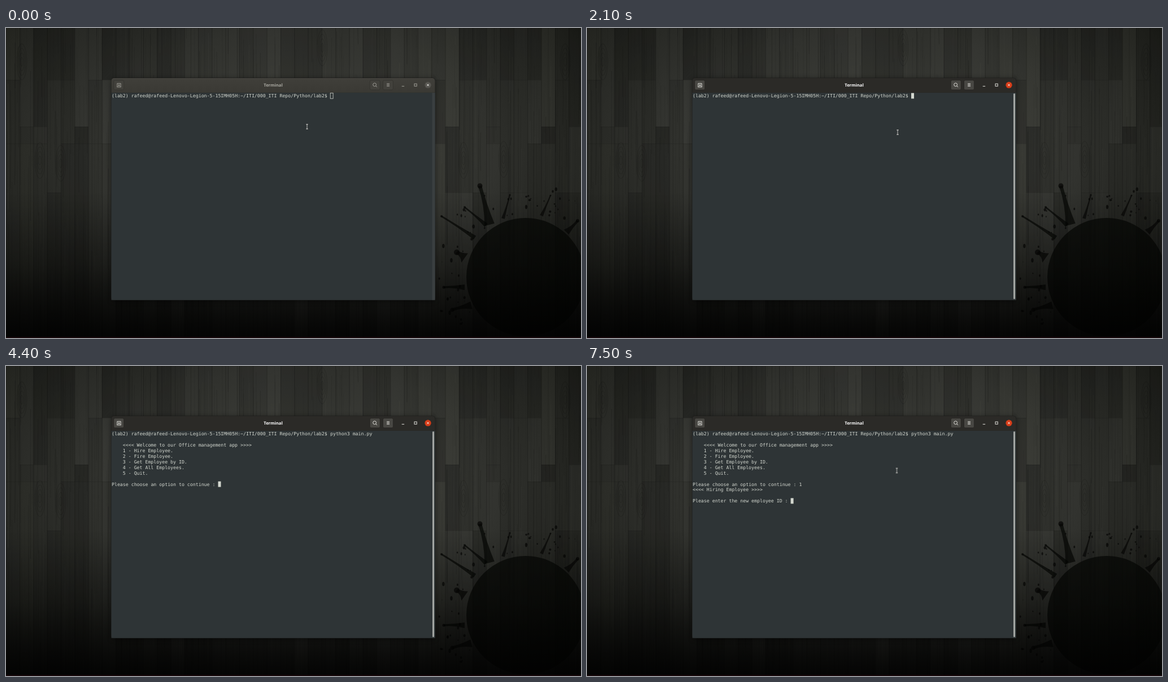
An HTML page with a canvas that plays this animation: 1018x550 px, repeating every 8000 ms.

```html
<!DOCTYPE html>
<html lang="en">
<head>
<meta charset="utf-8">
<title>Terminal session</title>
<style>
  html, body { margin: 0; width: 100%; height: 100%; overflow: hidden; background: #0a0b09; }
  canvas, svg { position: absolute; left: 0; top: 0; width: 1018px; height: 550px; }
  text { text-rendering: geometricPrecision; white-space: pre; }
  .term { font: 8.24px "DejaVu Sans Mono", "Noto Sans Mono", monospace; fill: #d3d7cf; }
  .title { font: bold 7.6px "Noto Sans", "Open Sans", sans-serif; text-anchor: middle; }

  .idle, .focus, .hollow, .block, .clear, .run, .menu, .hire, .mouse {
    animation: 8s step-end infinite;
  }
  .idle { animation-name: idle; }
  .focus { animation-name: focus; }
  .hollow { animation-name: hollow; }
  .block { animation-name: block; }
  .clear { animation-name: clear; }
  .run { animation-name: run; }
  .menu { animation-name: menu; }
  .hire { animation-name: hire; }
  .mouse { animation-name: mouse; }

  @keyframes idle { 0% { opacity: 1 } 26.25%, 100% { opacity: 0 } }
  @keyframes focus { 0% { opacity: 0 } 26.25%, 100% { opacity: 1 } }
  @keyframes hollow { 0% { opacity: 1 } 25%, 100% { opacity: 0 } }
  @keyframes clear { 0% { opacity: 0 } 33.75% { opacity: 1 } 37.5%, 100% { opacity: 0 } }
  @keyframes run { 0% { opacity: 0 } 37.5%, 100% { opacity: 1 } }
  @keyframes menu { 0% { opacity: 0 } 55%, 100% { opacity: 1 } }
  @keyframes hire { 0% { opacity: 0 } 78.75%, 100% { opacity: 1 } }

  /* text caret: steps over the cell grid and blinks */
  @keyframes block {
    0% { opacity: 0; transform: translate(574px, 115.4px) }
    25% { opacity: 1; transform: translate(574px, 115.4px) }
    33.75% { opacity: 1; transform: translate(598.8px, 115.4px) }
    37.5% { opacity: 1; transform: translate(648.4px, 115.4px) }
    45% { opacity: 0; transform: translate(648.4px, 115.4px) }
    52.5% { opacity: 1; transform: translate(648.4px, 115.4px) }
    53.75% { opacity: 1; transform: translate(187px, 125.3px) }
    55% { opacity: 1; transform: translate(375.5px, 204.7px) }
    61.25% { opacity: 0; transform: translate(375.5px, 204.7px) }
    68.75% { opacity: 1; transform: translate(375.5px, 204.7px) }
    78.75% { opacity: 1; transform: translate(360.6px, 234.4px) }
    86.25% { opacity: 0; transform: translate(360.6px, 234.4px) }
    93.75%, 100% { opacity: 1; transform: translate(360.6px, 234.4px) }
  }
  @keyframes mouse {
    0% { opacity: 1; transform: translate(533px, 175px) }
    3.75% { opacity: 1; transform: translate(533px, 174.7px) }
    5% { opacity: 1; transform: translate(532.7px, 174.7px) }
    25% { opacity: 1; transform: translate(544px, 183.3px) }
    26.25% { opacity: 1; transform: translate(550px, 185px) }
    27.5% { opacity: 1; transform: translate(548.5px, 185.5px) }
    32.5% { opacity: 0; transform: translate(548.5px, 185.5px) }
    91.25%, 100% { opacity: 1; transform: translate(548.5px, 185.5px) }
  }
</style>
</head>
<body>
<canvas id="wood" width="1018" height="550"></canvas>
<svg viewBox="0 0 1018 550">
  <defs>
    <filter id="soft" x="-10%" y="-10%" width="120%" height="120%"><feGaussianBlur stdDeviation="5"/></filter>
    <linearGradient id="bar" x2="0" y2="1">
      <stop stop-color="#403f3a"/><stop offset="1" stop-color="#3a3934"/>
    </linearGradient>
    <path id="frame" d="M186.5 114.8V94q0-5 5-5h563q5 0 5 5v20.8z"/>
    <g id="buttons">
      <rect x="190.7" y="92.7" width="18" height="17" rx="2.5"/>
      <rect x="644.2" y="92.7" width="18" height="17" rx="2.5"/>
      <rect x="667.4" y="92.7" width="18" height="17" rx="2.5"/>
    </g>
    <g id="icons" fill="none" stroke-width="1">
      <path d="M196.2 104.6h7.6M196.9 104.5v-6.2h6.2v6.2M200 99.8v3.6M198.2 101.6h3.6"/>
      <circle cx="652.6" cy="100.6" r="2.9"/><path d="M654.7 102.7l2.2 2.2"/>
      <path d="M674 98.8h5M674 101h5M674 103.2h5"/>
      <path d="M700.7 103.3h4.4"/>
      <rect x="723" y="99" width="4.2" height="4.2"/>
    </g>
  </defs>

  <rect x="186" y="90" width="574" height="395" rx="5" opacity=".45" filter="url(#soft)"/>
  <rect x="186" y="88.5" width="574" height="394.6" rx="5" fill="#1c1d1b"/>
  <rect x="186.5" y="114.6" width="573" height="368" fill="#2e3436"/>

  <g class="idle">
    <use href="#frame" fill="url(#bar)"/>
    <path d="M190 89.5h566" stroke="#4a4944" stroke-width=".6"/>
    <use href="#buttons" fill="#42413c" stroke="#32312d" stroke-width=".7"/>
    <use href="#icons" stroke="#a09f98"/>
    <text class="title" x="473" y="103.8" fill="#a9a8a1">Terminal</text>
    <circle cx="747" cy="101.2" r="5.6" fill="#55544f"/>
    <rect x="754.5" y="115" width="5" height="367.5" fill="#3a3f40"/>
  </g>
  <g class="focus">
    <use href="#frame" fill="#2b2a27"/>
    <use href="#buttons" fill="#484743" stroke="#242320" stroke-width=".7"/>
    <use href="#icons" stroke="#e4e3de"/>
    <text class="title" x="473" y="103.8" fill="#fff">Terminal</text>
    <circle cx="747" cy="101.2" r="5.6" fill="#d73c18"/>
    <rect x="754.3" y="115" width="5.2" height="367.5" fill="#343a3b"/>
    <rect x="755" y="116" width="3" height="365" rx="1.5" fill="#a3a6a3"/>
  </g>
  <path d="M745.2 99.4l3.6 3.6M748.8 99.4l-3.6 3.6" stroke="#f4f3ef"/>

  <rect class="hollow" x="574.2" y="115.3" width="4.9" height="9.9" fill="none" stroke="#d3d7cf" stroke-width=".8"/>
  <g class="term">
    <text x="187" y="123.2">(lab2) rafeed@rafeed-Lenovo-Legion-5-15IMH05H:~/ITI/000_ITI Repo/Python/lab2$ </text>
    <text class="clear" x="574" y="123.2">clear</text>
    <text class="run" x="574" y="123.2">python3 main.py</text>
    <g class="menu">
      <text x="206.8" y="143">&lt;&lt;&lt;&lt; Welcome to our Office management app &gt;&gt;&gt;&gt;</text>
      <text x="206.8" y="152.9">1 - Hire Employee.</text>
      <text x="206.8" y="162.9">2 - Fire Employee.</text>
      <text x="206.8" y="172.8">3 - Get Employee by ID.</text>
      <text x="206.8" y="182.7">4 - Get All Employees.</text>
      <text x="206.8" y="192.6">5 - Quit.</text>
      <text x="187" y="212.5">Please choose an option to continue :</text>
    </g>
    <g class="hire">
      <text x="375.5" y="212.5">1</text>
      <text x="187" y="222.4">&lt;&lt;&lt;&lt; Hiring Employee &gt;&gt;&gt;&gt;</text>
      <text x="187" y="242.2">Please enter the new employee ID :</text>
    </g>
  </g>
  <rect class="block" width="5" height="9.9" fill="#d3d7cf"/>
  <g class="mouse" fill="none" stroke-linecap="square">
    <path d="M-1.6-4H1.6M0-4V4M-1.6 4H1.6" stroke="#15181a" stroke-width="2"/>
    <path d="M-1.6-4H1.6M0-4V4M-1.6 4H1.6" stroke="#eceeea" stroke-width=".9"/>
  </g>
</svg>
<script>
  const W = 1018, H = 550;
  const ctx = document.getElementById('wood').getContext('2d');
  let seed = 41;
  const rnd = (a = 0, b = 1) => {
    seed = (seed * 16807) % 2147483647;
    return a + (b - a) * seed / 2147483647;
  };

  function light() {
    ctx.save();
    ctx.translate(509, 215);
    ctx.scale(600, 350);
    const g = ctx.createRadialGradient(0, 0, 0, 0, 0, 1.25);
    g.addColorStop(0, '#40413c');
    g.addColorStop(.48, '#30312d');
    g.addColorStop(.8, '#1e1f1b');
    g.addColorStop(1, '#10110e');
    ctx.fillStyle = g;
    ctx.fillRect(-1, -1, 2, 3);
    ctx.restore();
  }

  function plank(x, w) {
    const joints = [0, rnd() < .5 ? 92 : 175, rnd() < .5 ? 205 : 292, H];
    for (let i = 0; i < 3; i++) {
      const top = joints[i], h = joints[i + 1] - top;
      const tone = rnd(-.2, .07);
      ctx.fillStyle = tone < 0 ? `rgba(0,0,0,${-tone})` : `rgba(190,190,175,${tone * .6})`;
      ctx.fillRect(x, top, w, h);
      ctx.fillStyle = 'rgba(0,0,0,.16)';
      ctx.fillRect(x, top, w, .8);
    }
    ctx.fillStyle = 'rgba(0,0,0,.25)';
    ctx.fillRect(x, 0, .9, H);
    for (let i = 0; i < 18; i++) {
      const gx = x + rnd(1, w - 1), y = rnd(-80, H), len = rnd(60, 320), bend = rnd(-2, 2);
      ctx.strokeStyle = rnd() < .7 ? `rgba(0,0,0,${rnd(.05, .2)})` : `rgba(200,200,185,${rnd(.01, .05)})`;
      ctx.lineWidth = rnd(.4, 1);
      ctx.beginPath();
      ctx.moveTo(gx, y);
      ctx.quadraticCurveTo(gx + bend, y + len / 2, gx, y + len);
      ctx.stroke();
    }
  }

  function knot(x, y) {
    ctx.strokeStyle = 'rgba(0,0,0,.2)';
    ctx.lineWidth = .7;
    for (let r = 1; r < 5; r++) {
      ctx.beginPath();
      ctx.ellipse(x, y, r * 2.2, r * 8, 0, 0, 7);
      ctx.stroke();
    }
  }

  function dot(x, y, r, stretch = 1) {
    ctx.beginPath();
    ctx.ellipse(x, y, r, r * stretch, 0, 0, 7);
    ctx.fill();
  }

  // tapered drip from (x1,y1) to (x2,y2)
  function drip(x1, y1, x2, y2, w) {
    const a = Math.atan2(y2 - y1, x2 - x1) + Math.PI / 2;
    const dx = Math.cos(a) * w, dy = Math.sin(a) * w;
    ctx.beginPath();
    ctx.moveTo(x1 - dx, y1 - dy);
    ctx.quadraticCurveTo((x1 + x2) / 2, (y1 + y2) / 2, x2 - dx * .35, y2 - dy * .35);
    ctx.lineTo(x2 + dx * .35, y2 + dy * .35);
    ctx.quadraticCurveTo((x1 + x2) / 2 + dx * .4, (y1 + y2) / 2 + dy * .4, x1 + dx, y1 + dy);
    ctx.fill();
    dot(x2, y2, w * .5);
  }

  function splash() {
    const cx = 920, cy = 442;
    ctx.fillStyle = 'rgba(5,6,4,.7)';
    dot(cx, cy, 105);
    drip(856, 349, 839, 280, 9);
    drip(850, 350, 812, 318, 4);
    drip(880, 338, 892, 296, 3);
    drip(812, 408, 798, 398, 10);
    drip(830, 372, 771, 334, 4);
    drip(812, 460, 775, 460, 5);
    drip(824, 492, 790, 500, 7);
    drip(948, 333, 964, 297, 3);
    drip(992, 362, 1012, 342, 6);
    for (let i = 0; i < 60; i++) {
      const a = rnd(2.5, 5.3), d = rnd(112, 165);
      dot(cx + Math.cos(a) * d, cy + Math.sin(a) * d, rnd(.5, 2.4), rnd(.8, 1.8));
    }
  }

  light();
  for (let x = 0; x < W; x += 24.3) plank(x, 24.3);
  [[60, 235], [97, 240], [810, 235], [881, 233], [560, 35], [990, 60], [28, 60]].forEach(p => knot(...p));
  splash();
  const shade = ctx.createLinearGradient(0, 290, 0, H);
  shade.addColorStop(0, 'rgba(0,0,0,0)');
  shade.addColorStop(.5, 'rgba(0,0,0,.3)');
  shade.addColorStop(1, 'rgba(0,0,0,.85)');
  ctx.fillStyle = shade;
  ctx.fillRect(0, 290, W, H - 290);
  ctx.fillStyle = '#16070a';
  ctx.fillRect(0, 548, W, 2);
</script>
</body>
</html>
```
